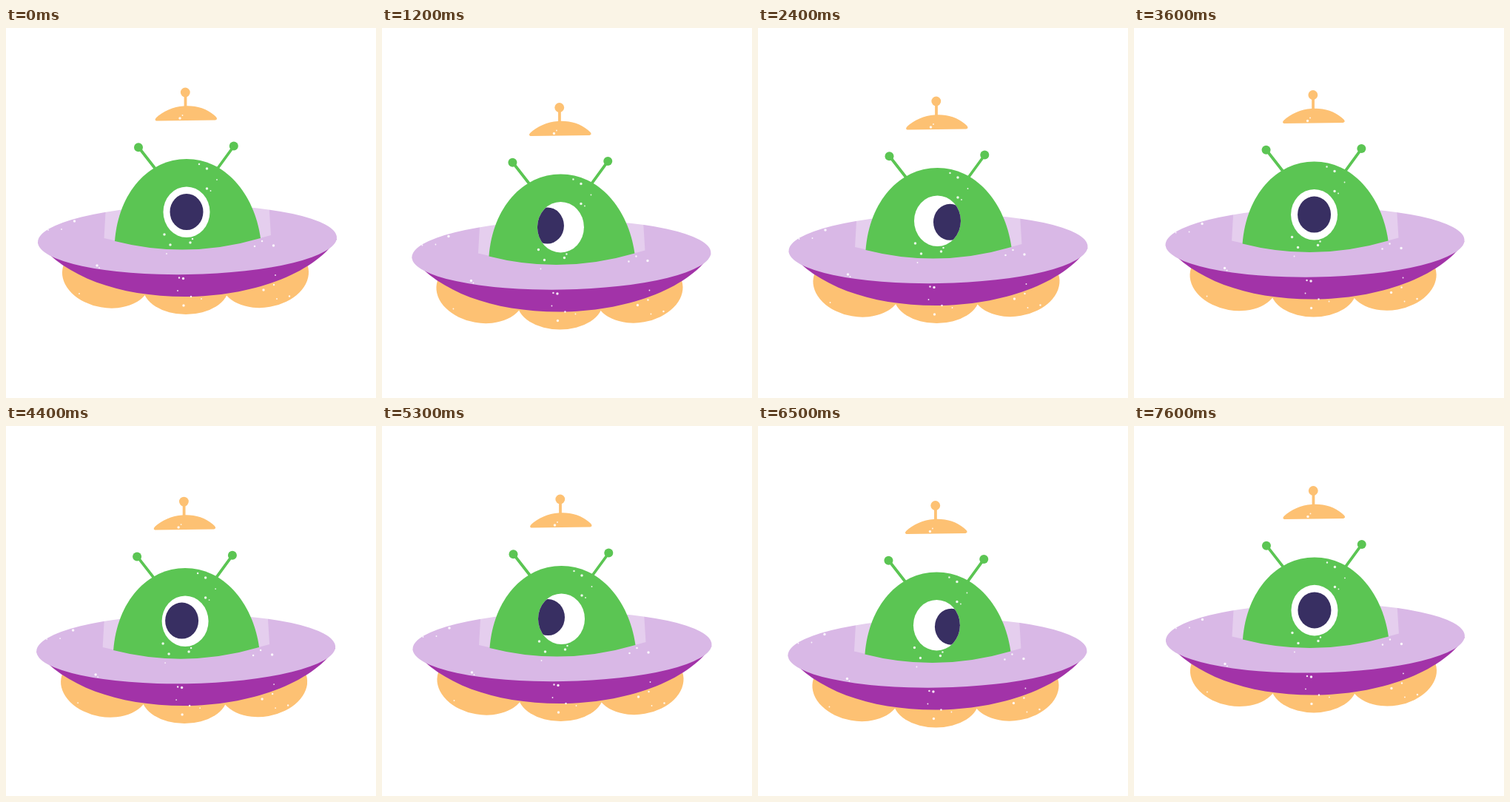
An HTML page without scripts for the animation above (7660 ms loop, 500 by 500 pixels).

```html
<!DOCTYPE html>
<html lang="en">
<head>
<meta charset="utf-8">
<title>Flying saucer</title>
<style>
@property --t { syntax: "<number>"; inherits: true; initial-value: 0; }

html, body { margin: 0; width: 100%; height: 100%; overflow: hidden; background: #fff; }
svg { display: block; width: 100%; height: 100%; animation: tick 3830ms steps(48) infinite; }
@keyframes tick { to { --t: 48; } }

/* two bobs per cycle, drifting slightly left on the way down */
.ship {
  --drop: calc(12 - 12 * cos(var(--t) * 15deg));
  transform: translate(calc(var(--drop) * -.125px), calc(var(--drop) * 1px));
}

/* look left, sweep right, return to the centre */
.pupil {
  --left: calc(1 - cos(clamp(0, (var(--t) - 4) / 9, 1) * 180deg));
  --right: calc(1 - cos(clamp(0, (var(--t) - 21) / 11, 1) * 180deg));
  --back: calc(1 - cos(clamp(0, (var(--t) - 36) / 9, 1) * 180deg));
  --x: calc(19 * var(--right) - 9 * var(--left) - 10 * var(--back));
  transform: translate(calc(var(--x) * 1px), calc(var(--x) * .11px));
  fill: #382f62;
}

.orange { fill: #fdc173; stroke: #fdc173; }
.green { fill: #5bc553; stroke: #5bc553; }
.orange *, .green * { stroke-width: 0; }
.orange .rod, .green .rod { stroke-width: 3.8; }
.specks { fill: none; stroke: #fff; stroke-opacity: .88; stroke-linecap: round; }
</style>
</head>
<body>
<svg viewBox="0 0 500 500">
  <clipPath id="eye"><ellipse cx="244" cy="248.7" rx="31.5" ry="34.3"/></clipPath>
  <g class="ship">
    <g class="orange">
      <ellipse cx="135.5" cy="336" rx="60" ry="42" transform="rotate(10 135.5 336)"/>
      <ellipse cx="349.5" cy="335.5" rx="60" ry="42" transform="rotate(-10 349.5 335.5)"/>
      <ellipse cx="243" cy="350" rx="58" ry="37"/>
      <path class="rod" d="M242.5 88V110"/>
      <circle cx="242.3" cy="87" r="6.4"/>
      <path d="M203 125.5Q199 124 206 118.5C228 101 262 101 281 117.5Q288 123 283 124.5Z"/>
    </g>

    <path fill="#a233a8" d="M43 290C80 335 150 363 242 363C330 363 415 333 447 285Z"/>
    <ellipse cx="245" cy="286.3" rx="202" ry="46.8" fill="#d9b8e6" transform="rotate(-.9 245 286.3)"/>
    <path fill="#fff" fill-opacity=".3" d="M135 240L132.500 284Q245 313 358 280L355.500 240Z"/>

    <g class="green">
      <path class="rod" d="M179 161L204 193M308 159.500L285 191"/>
      <circle cx="179" cy="161.3" r="6"/>
      <circle cx="307.800" cy="159.600" r="6"/>
      <path d="M147 288C152 222 193 177 244 177C295 177 335 222 344 284Q245 313 147 288Z"/>
    </g>

    <g clip-path="url(#eye)">
      <path fill="#fff" d="M210 212h68v74h-68z"/>
      <ellipse class="pupil" cx="244" cy="248.500" rx="22.500" ry="24.500"/>
    </g>

    <g class="specks">
      <path stroke-width="1.8" d="M57 273h0M75 272h0M285 205h0M276.500 220h0M217 305h0M126 324h0M232 355h0M264 366h0M99 359h0M364 334h0M366 366h0M238.500 118h0"/>
      <path stroke-width="2.500" d="M261 184h0M252 285h0M336 295h0M346 288h0M234 337.500h0M362 347h0M383 362.500h0M250 363h0"/>
      <path stroke-width="3.500" d="M92.500 261h0M271.500 190h0M271.500 217h0M214 279h0M222 293h0M249 290h0M361.500 294h0M123 321h0M239.500 338.500h0M240 375h0M348 354h0M235 122h0"/>
    </g>
  </g>
</svg>
</body>
</html>
```
